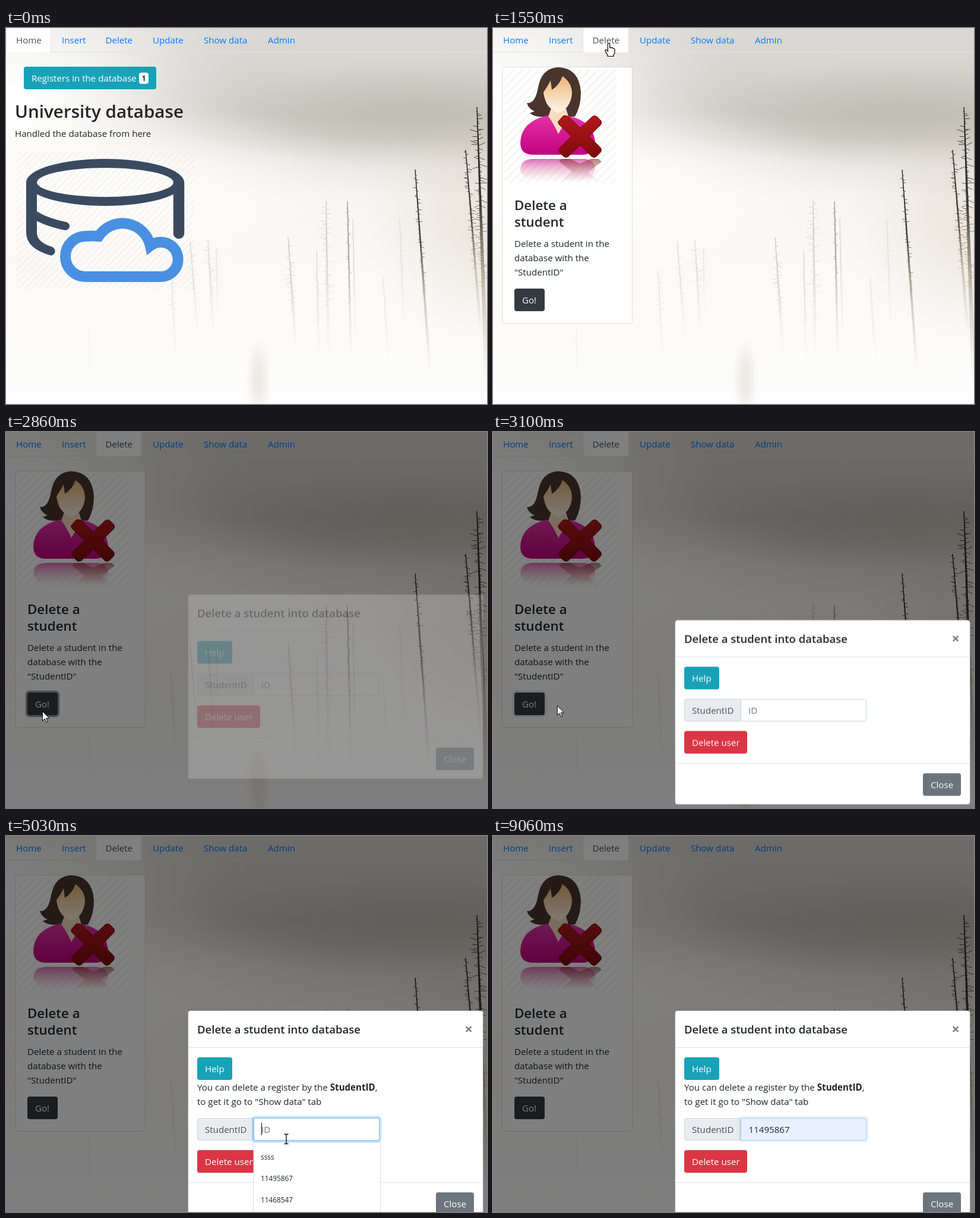
These frames come from a looping animation (810 px wide and 632 px high, 9.14 s). An HTML page with a canvas:

```html
<!DOCTYPE html>
<html lang="en">
<head>
<meta charset="utf-8">
<title>Delete a student</title>
<style>
  html, body { margin: 0; width: 100%; height: 100%; overflow: hidden; background: #fff; }
  canvas, svg { position: absolute; left: 0; top: 0; width: 810px; height: 632px; display: block; }
  text { font: 15.1px "Open Sans", "Noto Sans", sans-serif; fill: #212529; white-space: pre; }
  .h2 { font-size: 29.6px; font-weight: 600; }
  .h4 { font-size: 22.3px; font-weight: 600; }
  .h5 { font-size: 18.5px; font-weight: 600; }
  .w { fill: #fff; }
  .link { fill: #007bff; }
  .tab { fill: #fff; stroke: #dee2e6; }
  .ring { fill: none; stroke-width: 6.4; opacity: 0; }
  .hint { font-size: 11.8px; font-weight: 500; }
  .off { opacity: 0; }
</style>
</head>
<body>
<canvas id="photo" width="810" height="632"></canvas>
<svg viewBox="0 0 810 632">
  <defs>
    <pattern id="hatchA" width="8" height="8" patternUnits="userSpaceOnUse" patternTransform="rotate(-45)">
      <path d="M0 4H8" stroke="#000" stroke-opacity=".045" stroke-width="1.6"/>
    </pattern>
    <pattern id="hatchB" width="10" height="10" patternUnits="userSpaceOnUse" patternTransform="rotate(-45)">
      <path d="M0 5H10" stroke="#000" stroke-opacity=".04" stroke-width="3"/>
    </pattern>
    <linearGradient id="skin" x2="0" y2="1">
      <stop offset=".1" stop-color="#eebb80"/><stop offset=".9" stop-color="#fdf0df"/>
    </linearGradient>
    <linearGradient id="shirt" x2="0" y2="1">
      <stop offset="0" stop-color="#e233a8"/><stop offset="1" stop-color="#c4007f"/>
    </linearGradient>
    <linearGradient id="red" x2="0" y2="1">
      <stop offset="0" stop-color="#b3191c"/><stop offset="1" stop-color="#7f0a0c"/>
    </linearGradient>
    <linearGradient id="mirror" x2="0" y2="1">
      <stop offset="0" stop-color="#c8108a" stop-opacity=".6"/><stop offset="1" stop-color="#e9a" stop-opacity="0"/>
    </linearGradient>
    <linearGradient id="mirrorRed" x2="0" y2="1">
      <stop offset="0" stop-color="#8a3030" stop-opacity=".6"/><stop offset="1" stop-color="#b77" stop-opacity="0"/>
    </linearGradient>
  </defs>

  <!-- tabs -->
  <path d="M0 40.5H810" stroke="#dee2e6"/>
  <path id="tabHome" class="tab" d="M.5 41V-6H75.500V41"/>
  <path id="tabHover" class="off" d="M151.500 40V-.5H228.500V40" fill="none" stroke="#e9ecef"/>
  <path id="tabDelete" class="tab off" d="M151.500 41V-6H228.500V41"/>
  <text id="navHome" class="link" x="17" y="26">Home</text>
  <text class="link" x="94" y="26">Insert</text>
  <text id="navDelete" class="link" x="167.500" y="26">Delete</text>
  <text class="link" x="247" y="26">Update</text>
  <text class="link" x="333" y="26">Show data</text>
  <text class="link" x="441" y="26">Admin</text>

  <!-- home pane -->
  <g id="home">
    <rect id="registers" x="30" y="65" width="223" height="38" rx="4" fill="#17a2b8"/>
    <text class="w" x="43" y="90">Registers in the database</text>
    <rect x="224" y="75" width="16" height="19" rx="4" fill="#f8f9fa"/>
    <text x="232" y="89" text-anchor="middle" style="font-size:11.500px;font-weight:700">1</text>
    <text class="h2" x="15" y="151">University database</text>
    <text x="15" y="183">Handled the database from here</text>
    <rect x="18" y="208" width="299" height="231" fill="url(#hatchA)"/>
    <path fill="#3a4a60" fill-rule="evenodd" d="M34 259.500A133 39.500 0 0 1 300 259.500A133 39.500 0 0 1 34 259.500ZM52 259.500A115 24.500 0 0 0 282 259.500A115 24.500 0 0 0 52 259.500Z"/>
    <g fill="none" stroke="#3a4a60" stroke-linecap="round">
      <path d="M291 260V345" stroke-width="18.500"/>
      <path d="M43 260V345" stroke-width="18" stroke-linecap="butt"/>
      <path d="M34 344Q34 370 74 382Q79 383 82 378Q84 371 78 368Q52 360 52 344Z" fill="#3a4a60" stroke="none"/>
      <path d="M44 311Q62 325 100 333" stroke-width="14"/>
    </g>
    <path d="M134 418A34 34 0 0 1 134 350Q146 349 156 350A48 48 0 0 1 243 366A29 29 0 1 1 261 418Z"
      fill="none" stroke="#4a90e2" stroke-width="18"/>
  </g>

  <!-- delete pane -->
  <g id="card" class="off">
    <rect x="15.500" y="65.500" width="219" height="431" rx="4" fill="#fff" fill-opacity=".93" stroke="#000" stroke-opacity=".125"/>
    <rect x="20" y="70" width="189" height="190" fill="url(#hatchB)"/>
    <path d="M76 100Q82 67 110 66Q145 67 148 108Q148 132 138 149H84Q70 150 62 143L70 140Q60 136 57 126Q71 128 76 100Z" fill="#49352c"/>
    <path d="M99 132H122L128 152L110 178L92 152Z" fill="#f6dcc0"/>
    <path d="M85 108Q92 98 97 88L99 104Q112 96 117 81Q133 92 133 110Q131 135 110 143Q88 135 85 108Z" fill="url(#skin)"/>
    <path d="M46 193Q47 157 92 147Q102 160 110 178Q119 163 128 148Q170 157 172 193Q172 211 153 213H66Q46 212 46 193Z" fill="url(#shirt)"/>
    <path d="M46 236Q48 221 66 220H153Q171 221 172 236Q170 252 150 258H70Q48 254 46 236Z" fill="url(#mirror)"/>
    <path d="M111 224L116 220H130L147 228L164 220H178L183 225L160 242L180 258H114L133 242Z" fill="url(#mirrorRed)"/>
    <path d="M110 157L118 148Q123 146 127 149L147 168L167 149Q171 146 175 149L182 156Q184 160 181 163L162 182L181 201Q184 205 181 209L174 216Q170 219 166 216L147 197L127 216Q123 219 119 216L112 209Q109 205 113 201L132 182L112 163Q109 160 110 157Z"
      fill="url(#red)" stroke="#6d0709"/>
    <text class="h4" x="36" y="306">Delete a</text>
    <text class="h4" x="36" y="334">student</text>
    <text x="36" y="368">Delete a student in the</text>
    <text x="36" y="392">database with the</text>
    <text x="36" y="416">"StudentID"</text>
    <rect id="goRing" class="ring" x="36" y="438" width="51" height="38" rx="4" stroke="#343a40" stroke-opacity=".5"/>
    <rect id="go" x="36" y="438" width="51" height="38" rx="4" fill="#343a40"/>
    <text class="w" x="49" y="463">Go!</text>
  </g>

  <rect id="backdrop" class="off" width="810" height="632"/>

  <!-- dialog -->
  <g id="modal" class="off">
    <path d="M.5 200V5Q.5 .5 5 .5H493Q497.500 .5 497.500 5V200" fill="#fff" stroke="#000" stroke-opacity=".2"/>
    <path d="M1 62.500H497" stroke="#dee2e6"/>
    <text class="h5" x="16" y="39">Delete a student into database</text>
    <text x="473" y="40" text-anchor="middle" style="font-size:24px;font-weight:700;fill:#7f7f7f">×</text>
    <text x="16" y="135">You can delete a register by the <tspan font-weight="700">StudentID</tspan>,</text>
    <text x="16" y="159">to get it go to "Show data" tab</text>
    <g id="lower">
      <path d="M.5 117V306Q.5 310.500 5 310.500H493Q497.500 310.500 497.500 306V117" fill="#fff" stroke="#000" stroke-opacity=".2"/>
      <path d="M16.500 137Q16.500 133.500 20 133.500H111V170.500H20Q16.500 170.500 16.500 167Z" fill="#e9ecef" stroke="#ced4da"/>
      <text x="29" y="158" style="fill:#495057">StudentID</text>
      <rect id="inputRing" class="ring" x="111" y="133" width="212" height="38" rx="3" stroke="#007bff" stroke-opacity=".25"/>
      <rect id="input" x="111.500" y="133.500" width="211" height="37" rx="3" fill="#fff" stroke="#ced4da"/>
      <text id="placeholder" x="124" y="158" style="fill:#6c757d">ID</text>
      <text id="value" class="off" x="124.500" y="158">11495867</text>
      <path id="caretStart" class="off" d="M124.500 141V162" stroke="#000"/>
      <path id="caretEnd" class="off" d="M193.500 141V162" stroke="#000"/>
      <rect id="deleteUser" x="16" y="187" width="106" height="38" rx="4" fill="#dc3545"/>
      <text class="w" x="29" y="212">Delete user</text>
      <path d="M1 241.500H497" stroke="#dee2e6"/>
      <rect id="close" x="418" y="258" width="64" height="38" rx="4" fill="#6c757d"/>
      <text class="w" x="431" y="283">Close</text>
    </g>
    <rect id="helpRing" class="ring" x="16" y="79" width="59" height="38" rx="4" stroke="#17a2b8" stroke-opacity=".5"/>
    <rect id="help" x="16" y="79" width="59" height="38" rx="4" fill="#17a2b8"/>
    <text class="w" x="29" y="104">Help</text>
  </g>

  <!-- suggestions -->
  <g id="list" class="off">
    <rect x="416.500" y="514.500" width="214" height="130" fill="#fff" stroke="#000" stroke-opacity=".15"/>
    <rect id="row" class="off" x="417" y="557" width="213" height="36" fill="#eee"/>
    <text class="hint" x="429" y="544">ssss</text>
    <text class="hint" x="429" y="580">11495867</text>
    <text class="hint" x="429" y="616">11468547</text>
  </g>

  <g id="cursor" stroke="#000">
    <path id="arrow" class="off" fill="#fff" d="M.5 .5V16.500L4.200 13L6.600 18.700L9 17.700L6.600 12H11.800Z"/>
    <path id="hand" class="off" fill="#fff" stroke-width="1.200" d="M-1.700 2Q0 -1 1.700 2V8Q3.200 6.800 4.500 8.600Q6.200 7.600 7.300 9.400Q9.500 9 10 11V16Q9.700 19 8 20.500V22.500H-2V20.500Q-4 18 -6 13.500Q-6.300 11 -4 11.700L-1.700 14Z"/>
    <path id="beam" class="off" fill="none" stroke-width="1.300" d="M-3.500 -8H-1Q0 -8 0 -7V7Q0 8 -1 8H-3.500M3.500 -8H1Q0 -8 0 -7M3.500 8H1Q0 8 0 7"/>
  </g>
</svg>
<script>
const LOOP = 9140, FADE = 150;

// ---- misty backdrop ----
const ctx = document.getElementById('photo').getContext('2d');
let seed = 11;
const rnd = () => (seed = seed * 16807 % 2147483647) / 2147483647;

function gradient(h, y, stops) {
  const g = ctx.createLinearGradient(0, y, 0, y + h);
  for (const [at, color] of stops) g.addColorStop(at, color);
  return g;
}

// soft elliptical blot
function mist(x, y, rx, ry, rgb, alpha) {
  ctx.save();
  ctx.translate(x, y);
  ctx.scale(rx, ry);
  const g = ctx.createRadialGradient(0, 0, 0, 0, 0, 1);
  for (let i = 0; i <= 10; i++) {
    const r = i / 10;
    g.addColorStop(r, `rgba(${rgb},${alpha * (1 - r * r) ** 2})`);
  }
  ctx.fillStyle = g;
  ctx.fillRect(-1, -1, 2, 2);
  ctx.restore();
}

// nearer trees (higher alpha) are darker, far ones warm and pale
function tree(x, y, lean, h, w, alpha, reach) {
  const c = 24 + 130 * (1 - alpha), rgb = `${c},${c * .9},${c * .75}`;
  ctx.fillStyle = ctx.strokeStyle = gradient(h, y, [
    [0, `rgba(${rgb},${alpha})`],
    [.35, `rgba(${rgb},${alpha * .8})`],
    [.65, `rgba(130,112,88,${alpha * .35})`],
    [1, 'rgba(170,155,130,0)']]);
  ctx.beginPath();
  ctx.moveTo(x - .6, y);
  ctx.lineTo(x + .6, y);
  ctx.lineTo(x + lean + w / 2, y + h);
  ctx.lineTo(x + lean - w / 2, y + h);
  ctx.fill();
  ctx.lineWidth = .8;
  ctx.beginPath();
  for (let d = 2; d < h * .65; d += 1.5 + rnd() * 4) {
    const px = x + lean * d / h, side = rnd() < .5 ? -1 : 1;
    const len = reach * (.2 + rnd()) * Math.min(1, .3 + d / 40);
    ctx.moveTo(px, y + d);
    ctx.lineTo(px + side * len, y + d + (rnd() - .5) * len);
  }
  ctx.stroke();
}

ctx.fillStyle = gradient(632, 0, [
  [0, '#dad9d5'], [.1, '#d6d5d0'], [.23, '#cdcbc4'], [.29, '#d5d3cc'],
  [.36, '#e9e7e3'], [.45, '#f7f5f2'], [.65, '#fbfaf8'], [1, '#fdfdfd']]);
ctx.fillRect(0, 0, 810, 632);
mist(690, 145, 380, 100, '168,164,148', .32);
mist(810, 330, 230, 230, '205,194,172', .3);
mist(0, 130, 430, 300, '255,255,255', 1);
mist(210, 270, 420, 170, '255,254,252', .9);
mist(425, 590, 24, 80, '170,155,125', .2);

[
  [140, 505, 2, 90, 2, .1, 3], [278, 408, 8, 150, 4, .16, 9], [310, 358, 14, 170, 4, .2, 6],
  [340, 355, 10, 170, 5, .2, 9], [354, 370, 2, 110, 3, .15, 9],
  [475, 352, 14, 200, 6, .28, 9], [523, 372, 4, 190, 4, .2, 6], [539, 290, 4, 270, 6, .28, 11],
  [575, 291, 6, 270, 4, .55, 4], [584, 320, 5, 220, 3, .22, 3], [635, 420, 10, 160, 3, .14, 4],
  [663, 320, 8, 210, 3, .16, 6], [689, 238, 25, 340, 5, .97, 5], [774, 205, 26, 310, 5, .97, 7],
  [793, 133, 17, 470, 9, 1, 11]
].forEach(t => tree(...t));

// ---- timeline ----
function track(id, prop, steps, ease = 'linear') {
  const frames = steps.map(([t, v, easing = ease]) => ({ offset: t / LOOP, [prop]: v, easing }));
  const last = steps[steps.length - 1];
  if (last[0] < LOOP) frames.push({ offset: 1, [prop]: last[1] });
  document.getElementById(id).animate(frames, { duration: LOOP, iterations: Infinity });
}
const cut = (id, prop, steps) => track(id, prop, steps, 'step-end');
function show(id, ...spans) {
  const steps = spans.flatMap(([a, b]) => [[a, 1], [b, 0]]);
  cut(id, 'opacity', spans[0][0] ? [[0, 0], ...steps] : steps);
}
const blend = (id, prop, off, on, a, b = LOOP) => track(id, prop, b < LOOP
  ? [[0, off], [a, off], [a + FADE, on], [b, on], [Math.min(b + FADE, LOOP), off]]
  : [[0, off], [a, off], [a + FADE, on]]);
const at = (x, y) => `translate(${x}px,${y}px)`;

// tabs and panes
show('tabHome', [0, 1150]);
show('tabHover', [720, 1150]);
show('tabDelete', [1150, LOOP]);
cut('navHome', 'fill', [[0, '#495057'], [1150, '#007bff']]);
cut('navDelete', 'fill', [[0, '#007bff'], [720, '#0056b3'], [1150, '#495057']]);
blend('home', 'opacity', 1, 0, 1150);
blend('card', 'opacity', 0, 1, 1300);

// buttons
blend('registers', 'fill', '#17a2b8', '#138496', 520, 690);
blend('go', 'fill', '#343a40', '#23272b', 2130, 2690);
blend('goRing', 'opacity', 0, 1, 2620, 2990);
blend('help', 'fill', '#17a2b8', '#138496', 3500, 4150);
blend('helpRing', 'opacity', 0, 1, 3700, 4700);
blend('deleteUser', 'fill', '#dc3545', '#c82333', 5950, 7210);
blend('close', 'fill', '#6c757d', '#5a6268', 7640, 7810);

// dialog
track('backdrop', 'opacity', [[0, 0], [2690, 0], [2840, .5]]);
blend('modal', 'opacity', 0, 1, 2830);
track('modal', 'transform', [
  [0, at(306, 267)], [2841, at(306, 267), 'ease-out'], [3141, at(306, 317)],
  [3817, at(306, 317), 'ease'], [4167, at(306, 293)]]);
track('lower', 'transform', [[0, at(0, 0)], [3817, at(0, 0), 'ease'], [4167, at(0, 48)]]);

// input and suggestions
blend('inputRing', 'opacity', 0, 1, 4700, 8970);
blend('input', 'stroke', '#ced4da', '#80bdff', 4700, 8970);
cut('input', 'fill', [[0, '#fff'], [5180, '#e8f0fe']]);
show('placeholder', [0, 5180]);
show('value', [5180, LOOP]);
show('list', [4800, 5430]);
show('row', [5180, 5430]);
show('caretStart', [4700, 5180]);
show('caretEnd', [5470, 6000], [6530, 7060], [7590, 8120], [8670, 8970]);

// pointer
track('cursor', 'transform', [
  [0, at(690, 543)], [70, at(690, 543)], [520, at(245, 105)], [690, at(205, 50)],
  [770, at(195, 25)], [1650, at(195, 25)], [2010, at(86, 402)], [2320, at(61, 469)],
  [2950, at(61, 469), 'ease-in-out'], [3490, at(349, 411)], [4250, at(349, 411)],
  [4570, at(468, 496)], [4890, at(472, 509)], [5030, at(472, 509)], [5260, at(462, 568)],
  [5660, at(462, 568)], [6200, at(402, 552)], [6350, at(402, 552)], [6650, at(399, 537)],
  [6700, at(399, 537)], [6980, at(390, 548)], [7130, at(390, 548)], [7640, at(735, 606)],
  [7810, at(772, 636)], [7960, at(790, 660)]]);
show('arrow', [70, 520], [1680, 2130], [2690, 3530], [4150, 4500], [5055, 5950], [7210, 7640]);
show('hand', [520, 1680], [2130, 2690], [3530, 4150], [5950, 7210], [7640, 7810]);
show('beam', [4500, 5055]);
</script>
</body>
</html>
```
